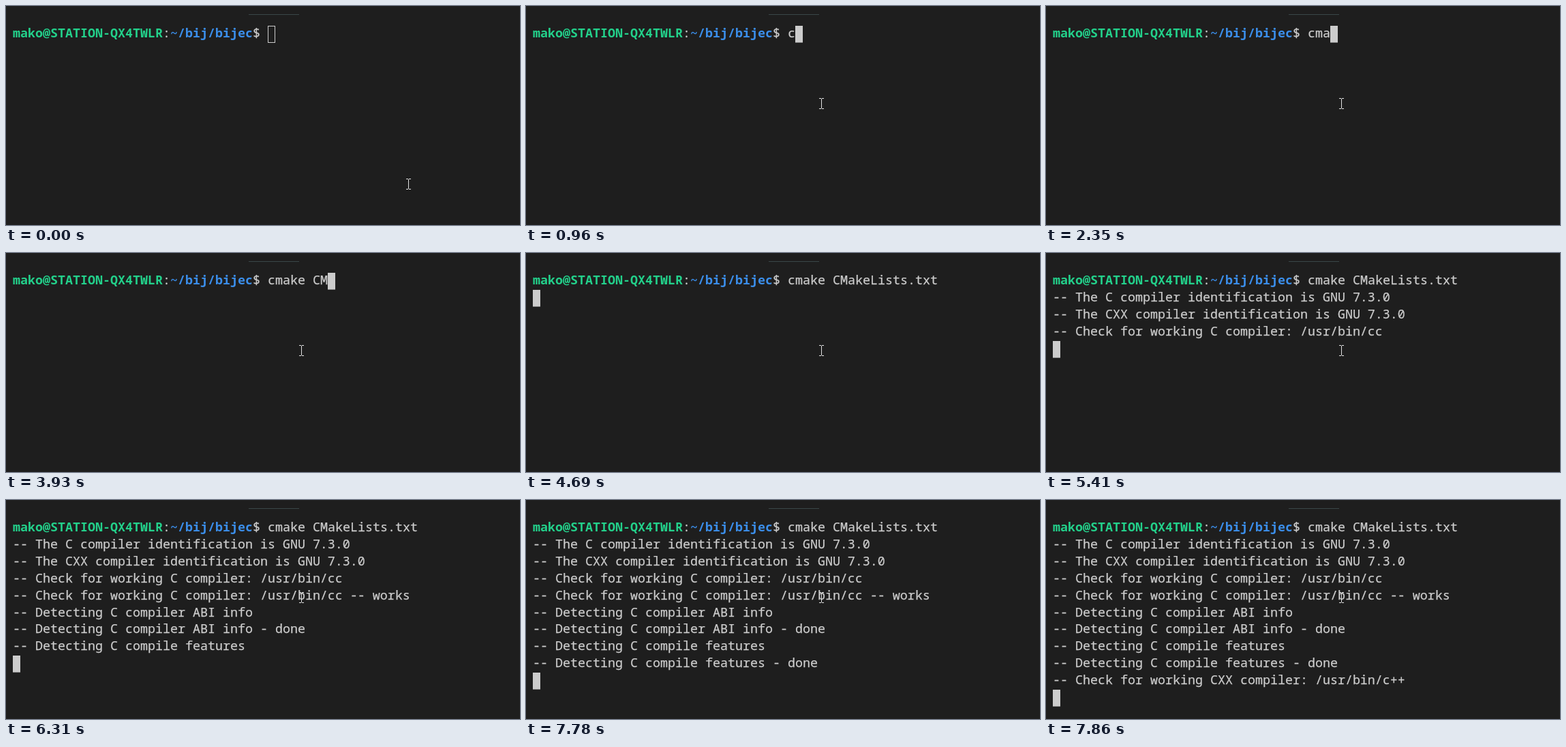
An HTML page that plays this animation: 754 by 321 pixels, repeating every 8 s.

```html
<!DOCTYPE html>
<html lang="en">
<head>
<meta charset="utf-8">
<title>Terminal</title>
<style>
  html, body { margin: 0; width: 100%; height: 100%; overflow: hidden; background: #1e1e1e; }
  svg { display: block; }
  text {
    font: 500 18.333px "Noto Sans Mono", "DejaVu Sans Mono", monospace;
    fill: #ccc; stroke: #ccc; stroke-width: .25px; white-space: pre;
  }
  .user, .path { font-weight: 700; stroke: none; }
  .user { fill: #23d18b; }
  .path { fill: #3b8eea; }
  #caret { fill: #ccc; }
  #caret.idle { fill: none; stroke: #ccc; }
  #click { fill: #ff0; fill-opacity: .47; }
  #mouse path { fill: none; stroke: #e4e4e4; }
</style>
</head>
<body>
<svg width="754" height="321" viewBox="0 0 754 321">
  <rect x="356" y="12" width="74" height="1" fill="#3a4749"/>
  <g id="screen">
    <text x="10" y="46" xml:space="preserve"><tspan class="user">mako@STATION-QX4TWLR</tspan>:<tspan class="path">~/bij/bijec</tspan>$</text>
  </g>
  <rect id="caret"/>
  <g id="mouse">
    <circle id="click" cx="-.5" cy=".5" r="10.5"/>
    <path d="M-3.5 -7.5h3m1 0h3M0 -7v14M-3.5 7.5h3m1 0h3"/>
  </g>
</svg>
<script>
const LOOP = 8000, ROWS = 11, CELL = 11, LEFT = 10, PROMPT = 34;
const FOCUS = 440, RELEASE = 530;

// What appears in the terminal, and when.
const SESSION = [
  [960, "c"], [2350, "ma"], [2440, "ke"], [3080, " "], [3540, "C"],
  [3930, "M"], [4050, "a"], [4220, "keLists.txt "], [4690, "\n"],
  [5060, "-- The C compiler identification is GNU 7.3.0\n"],
  [5310, "-- The CXX compiler identification is GNU 7.3.0\n"],
  [5410, "-- Check for working C compiler: /usr/bin/cc\n"],
  [5860, "-- Check for working C compiler: /usr/bin/cc -- works\n" +
         "-- Detecting C compiler ABI info\n"],
  [6310, "-- Detecting C compiler ABI info - done\n" +
         "-- Detecting C compile features\n"],
  [7780, "-- Detecting C compile features - done\n"],
  [7860, "-- Check for working CXX compiler: /usr/bin/c++\n"]
];

const [screen, caret, mouse, click] =
  ["screen", "caret", "mouse", "click"].map(id => document.getElementById(id));
const rowTop = row => Math.round(29 + 24.9 * row);
const startX = row => LEFT + (row ? 0 : PROMPT * CELL);

function setAttrs(node, attrs) {
  for (const name in attrs) node.setAttribute(name, attrs[name]);
}

const rows = Array.from({ length: ROWS }, (_, row) => {
  const line = document.createElementNS("http://www.w3.org/2000/svg", "text");
  setAttrs(line, { x: startX(row), y: rowTop(row) + 17, "xml:space": "preserve" });
  screen.append(line);
  return line;
});

function drawTerminal(t) {
  const lines = SESSION.filter(([start]) => t >= start)
    .map(([, chunk]) => chunk).join("").split("\n");
  rows.forEach((node, row) => node.textContent = lines[row] || "");

  const last = lines.length - 1;
  const idle = t < FOCUS, inset = idle ? 0.5 : 0;
  caret.setAttribute("class", idle ? "idle" : "");
  setAttrs(caret, {
    x: startX(last) + lines[last].length * CELL + inset,
    y: rowTop(last) + inset,
    width: CELL - 2 * inset,
    height: (idle ? 25 : 24.6) - 2 * inset
  });
}

// The pointer jumps to its resting place in two equal steps.
function drawMouse(t) {
  const p = Math.min(1, Math.floor(t / 70) / 2);
  setAttrs(mouse, { transform: `translate(${590.5 - 157 * p} ${261 - 118 * p})` });
  setAttrs(click, { visibility: t >= FOCUS && t < RELEASE ? "visible" : "hidden" });
}

const begin = performance.now();
function tick() {
  const t = (performance.now() - begin) % LOOP;
  drawTerminal(t);
  drawMouse(t);
  requestAnimationFrame(tick);
}
tick();
</script>
</body>
</html>
```
